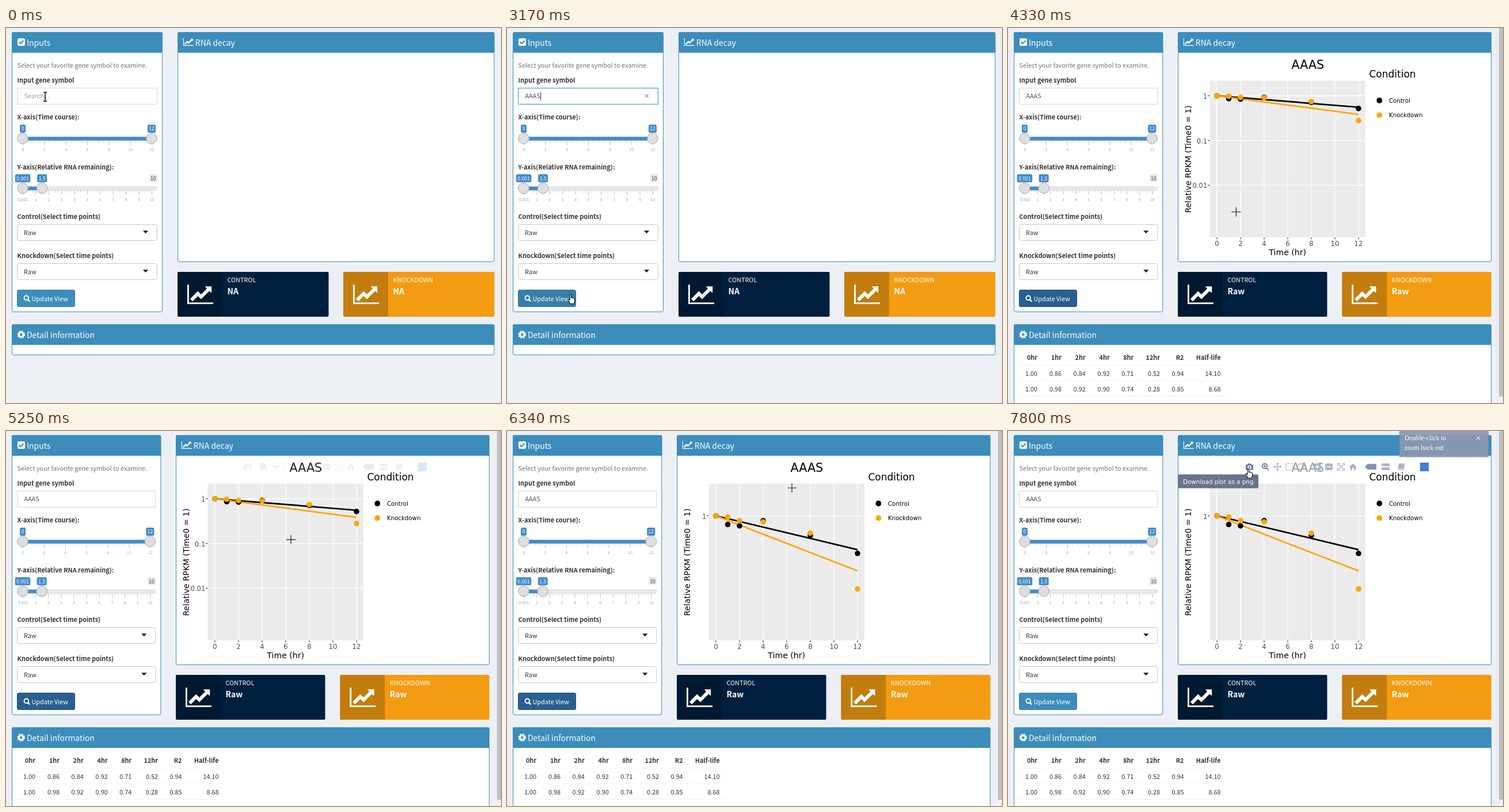
An HTML page that plays this animation: 860 px wide and 652 px high, repeating every 8 s.

```html
<!DOCTYPE html>
<html lang="en">
<head>
<meta charset="utf-8">
<title>RNA decay</title>
<style>
  html, body { margin: 0; width: 100%; height: 100%; overflow: hidden; background: #ecf0f5; }
  svg { display: block; width: 860px; height: 652px; }
  text { font-family: 'Noto Sans CJK JP', 'Noto Sans CJK SC', 'Noto Sans CJK', 'Open Sans', sans-serif; white-space: pre; }
  .b { font-weight: 700; }
  .v { font-family: 'DejaVu Sans', Verdana, sans-serif; }
  .s { font-family: 'Liberation Serif', serif; }
</style>
</head>
<body>
<svg id="stage" viewBox="0 0 860 652"></svg>
<script>
const BLUE = '#3c8dbc', SLIDE = '#428bca', BODY = 10.85, HEAD = 13.95;
const CHART = 'M2048 1536v128h-2048v-1536h128v1408h1920zM1920 288v435q0 21-19.5 29.5t-35.5-7.5l-121-121-633 633q-10 10-23 10t-23-10l-233-233-416 416-192-192 585-585q10-10 23-10t23 10l233 233 464-464-121-121q-16-16-7.5-35.5t29.5-19.5h435q14 0 23 9t9 23z';

const txt = (x, y, s, size = BODY, fill = '#333', more = '') =>
  `<text x="${x}" y="${y}" font-size="${size}" fill="${fill}" ${more}>${s}</text>`;
const bold = (x, y, s, size = BODY, fill = '#333', more = '') => txt(x, y, s, size, fill, 'class="b" ' + more);
const rect = (x, y, w, h, fill, more = '') =>
  `<rect x="${x}" y="${y}" width="${w}" height="${h}" fill="${fill}" ${more}/>`;
const dot = (x, y, r, fill, more = '') => `<circle cx="${x}" cy="${y}" r="${r}" fill="${fill}" ${more}/>`;
const line = (d, stroke, w = 1, more = '') => `<path d="${d}" fill="none" stroke="${stroke}" stroke-width="${w}" ${more}/>`;
const group = (id, s, more = '') => `<g id="${id}" ${more}>${s}</g>`;
const mid = 'text-anchor="middle"', end = 'text-anchor="end"';
const chart = (x, y, w) => `<path fill="#fff" transform="translate(${x} ${y}) scale(${w / 2048})" d="${CHART}"/>`;

function box(x, y, right, bottom, title, titleX) {
  return rect(x + .5, y + .5, right - x - 1, bottom - y - 1, '#fff', `rx="2.5" stroke="${BLUE}"`) +
    rect(x, y, right - x, 35.7, BLUE, 'rx="2"') + rect(x, y + 20, right - x, 15.7, BLUE) +
    txt(titleX, y + 23.2, title, HEAD, '#fff');
}

function bubble(x, y, s, w) {
  return rect(x - w / 2, y, w, 14, SLIDE, 'rx="2.5"') + txt(x, y + 10.4, s, 8.55, '#fff', mid);
}

function slider(y, right, to, labels, minor) {
  const x = 29, len = right - 9.5 - x, step = len / (labels.length - 1);
  let s = rect(19.5, y - 2.5, right - 19.5, 6, '#e9e9e9', 'rx="3" stroke="#d0d0d0" stroke-width=".8"') +
    rect(x, y - 2.8, len * to, 6.4, SLIDE);
  for (let i = 0; i <= (labels.length - 1) * minor; i++) {
    const tx = x + .5 + i * step / minor, major = i % minor == 0;
    s += line(`M${tx} ${y + 4}v${major ? 7.5 : 3.5}`, major ? '#8fc1e3' : '#c4d3dc', .9);
  }
  labels.forEach((l, i) => s += txt(x + .5 + i * step, y + 22, l, 7, '#96a9ab', mid));
  for (const tx of [x, x + len * to]) s += dot(tx, y, 9.3, '#dedede', 'stroke="#a9a9a9"');
  return s;
}

function select(y, right) {
  return rect(19.5, y, right - 19.5, 28, '#fff', 'rx="3.5" stroke="#c8c8c8"') + txt(31, y + 18.2, 'Raw') +
    `<path d="M${right - 24.7} ${y + 10.8}h9.4l-4.7 5z" fill="#222"/>`;
}

function valueBox(x, w, fill, name, value) {
  return rect(x, 424, w, 78, fill, 'rx="2"') + rect(x, 424, 78, 78, '#000', 'rx="2" opacity=".2"') +
    chart(x + 17, 443.5, 45) + txt(x + 86.5, 441.6, name, BODY, '#fff') + bold(x + 86.5, 462.6, value, HEAD, '#fff');
}

function page(id, left, plotX, right, vbW, vb2, value, bottom) {
  const r = left - 9.5, len = r - 38.5;
  const counts = [...Array(10)].map((_, i) => i + 1);
  return group(id,
    box(10, 7.3, left, 494, 'Inputs', 36) +
    rect(20, 18, 13, 13, '#fff', 'rx="2.5"') + line('M22.7 24.3l2.8 2.9 5.2-5.4', BLUE, 2.1) +
    box(plotX, 7.3, right, 407, 'RNA decay', plotX + 30.8) + chart(plotX + 9.8, 16.3, 18) +
    txt(19.5, 69.3, 'Select your favorite gene symbol to examine.', BODY, '#737373') +
    bold(19.5, 95.2, 'Input gene symbol') +
    rect(19.5, 104.5, r - 19.5, 28, '#fff', 'class="field" stroke="#d2d6de"') +
    bold(19.5, 159.3, 'X-axis(Time course):') +
    slider(192, r, 1, [0, 2, 4, 6, 8, 10, 12], 4) + bubble(29, 168, '0', 10) + bubble(29 + len, 168, '12', 14) +
    bold(19.5, 245.6, 'Y-axis(Relative RNA remaining):') +
    slider(278.5, r, .15, ['0.001', ...counts], 4) +
    bubble(29, 254.3, '0.001', 26.5) + bubble(29 + len * .15, 254.3, '1.5', 17) +
    rect(r - 13.5, 254.3, 13.5, 13.3, '#e4e4e4', 'rx="2.5"') + txt(r - 6.7, 264.5, '10', 8.55, '#444', mid) +
    bold(19.5, 332, 'Control(Select time points)') + select(341.5, r) +
    bold(19.5, 399.8, 'Knockdown(Select time points)') + select(409.5, r) +
    `<g class="vals">${valueBox(plotX, vbW, '#001f3f', 'CONTROL', value)}${valueBox(vb2, vbW, '#f39c12', 'KNOCKDOWN', value)}</g>` +
    box(10, 515.3, right, bottom, 'Detail information', 36) +
    dot(26.3, 533, 3.9, 'none', 'stroke="#fff" stroke-width="3.2"') +
    dot(26.3, 533, 5.8, 'none', 'stroke="#fff" stroke-width="2" stroke-dasharray="2.6 1.955"'));
}

function table() {
  const cols = [51, 93, 134.7, 176.7, 218.3, 264, 305.5, 369.5];
  const rows = ['0hr 1hr 2hr 4hr 8hr 12hr R2 Half-life', '1.00 0.86 0.84 0.92 0.71 0.52 0.94 14.10', '1.00 0.98 0.92 0.90 0.74 0.28 0.85 8.68'];
  return rows.map((row, j) => row.split(' ').map((s, i) =>
    (j ? txt : bold)(cols[i], [577.3, 604.7, 631.5][j], s, BODY, '#333', end)).join('')).join('') +
    line('M19 586.3H379M19 613.3H379M19 640.3H379', '#f2f2f2');
}

const hourX = h => 363 + h * 20.5;
const series = [
  ['#000', 14.10, [1, .86, .84, .92, .71, .52]],
  ['#ffa500', 8.68, [1, .98, .92, .90, .74, .28]]];

// one: y of value 1, decade: pixels per factor of ten
function plot(id, one, decade) {
  const py = v => one - decade * Math.log10(v);
  let s = rect(350.5, 91.5, 270.3, 272.5, '#ebebeb');
  for (let h = 0; h <= 12; h += 2) s += line(`M${hourX(h)} 91.5V364`, '#fff', 1.2);
  ['1', '0.1', '0.01'].forEach(l => {
    const y = py(+l);
    if (y < 360) s += line(`M350.5 ${y}h270.3`, '#fff', 1.2) + line(`M347 ${y}h3.5`, '#333', 1.1) +
      txt(346.3, y + 5, l, 11.6, '#4d4d4d', 'class="v" ' + end);
  });
  for (const [c, half] of series) s += line(`M${hourX(0)} ${one}L${hourX(12)} ${py(2 ** (-12 / half))}`, c, 2.7);
  for (const [c, , vals] of series)
    vals.forEach((v, i) => s += dot(hourX([0, 1, 2, 4, 8, 12][i]), py(v), 4.8, c));
  return group(id, s);
}

function frame() {
  let s = '';
  for (let h = 0; h <= 12; h += 2)
    s += line(`M${hourX(h)} 364v3.5`, '#333', 1.1) + txt(hourX(h), 379, h, 11.6, '#4d4d4d', 'class="v" ' + mid);
  s += txt(485.7, 395, 'Time (hr)', 14.1, '#000', 'class="v" ' + mid) +
    txt(0, 0, 'Relative RPKM (Time0 = 1)', 13.9, '#000', `class="v" ${mid} transform="translate(318.3 228) rotate(-90)"`) +
    txt(520.8, 71, 'AAAS', 20.7, '#000', 'class="v" ' + mid) +
    txt(627.5, 86.2, 'Condition', 17, '#000', 'class="v"');
  ['Control', 'Knockdown'].forEach((n, i) =>
    s += dot(645.3, 126 + i * 25.4, 4.9, series[i][0]) + txt(662, 129.8 + i * 25.4, n, 10.2, '#000', 'class="v"'));
  return s;
}

function modebar() {
  const c = '#a9b2c7', on = '#6d7b9e';
  return rect(409, 53.5, 329, 18, '#fff', 'opacity=".6"') +
    group('cam', '<path fill-rule="evenodd" d="M413 58.5h3l1.2-2h4.6l1.2 2h3v9.3h-13zM419.5 59.8a3.3 3.3 0 1 0 .01 0z"/>' + dot(419.5, 63.1, 1.7, 'inherit'), `fill="${c}"`) +
    dot(446, 61, 4.2, 'none', `stroke="${on}" stroke-width="2"`) + line('M449 64.3l4.2 4.2M443.8 61h4.4M446 58.8v4.4', on, 1.7) +
    line('M462 62h12.5M468.2 56v12.5M464 60l-2 2 2 2M472.4 60l2 2-2 2M466.2 58l2-2 2 2M466.2 66.5l2 2 2-2', c, 1.3) +
    rect(483, 56.5, 11.5, 11.5, 'none', `stroke="${c}" stroke-width="1.6" stroke-dasharray="2 1.6"`) +
    line('M506 67.5c-5-3-3-10 3-10.500s8 5 2 7.500-6 2-4 4.500', c, 1.5) +
    rect(531, 56.500, 12.500, 11.500, c, 'rx="1.5"') + line('M534 62.300h6.500M537.200 59v6.500', '#fff', 1.7) +
    rect(551.300, 56.500, 12.500, 11.500, c, 'rx="1.5"') + line('M554 62.300h7', '#fff', 1.7) +
    line('M573 60v-3.500h3.500M581 56.500h3.500V60M584.500 64.500V68H581M576.500 68H573v-3.500M575 58.500l7.500 7.500M582.500 58.500l-7.500 7.500', c, 1.4) +
    `<path fill="${c}" d="M592.800 62.500l6.600-6 6.600 6h-1.700v5.500h-3.500v-4h-2.800v4h-3.500v-5.500z"/>` +
    `<path fill="${on}" opacity=".85" d="M620 62l5-4.700h15v9.600h-15z"/>` +
    `<path fill="${c}" d="M648 59l2.200-2.500H663v4.800h-12.800zM648 65.500l2.200-2.300H663v4.800h-12.800z"/>` +
    `<path fill="${c}" d="M679.500 56.500h9.500l-2.300 9h-9.700z"/>` + line('M677.500 67.300h9.500l2-8', c, 1.2) +
    rect(716, 55, 15, 15, '#447adb');
}

function button() {
  return rect(19.5, 455.5, 100, 29, BLUE, 'id="btn" rx="2.5" stroke="#367fa9"') +
    dot(35.3, 469.3, 3.8, 'none', 'stroke="#fff" stroke-width="2"') + line('M38 472.200l3.200 3.300', '#fff', 2.5) +
    txt(44.5, 475, 'Update View', BODY, '#fff');
}

const HAND = 'M-1.300 8V1.200q0-1.200 1.200-1.200t1.200 1.200V6q1.200-.9 2.100.3 1.300-.7 2 .5 1.800-.5 1.800 1.300v3.500q0 2-1.200 3.700v1.200H-1v-1.200q-1-1.800-3-4.500-1-2 .6-2.200 1.100 0 2.100 1.400z';
const cursors =
  group('ibeam', line('M-3 -8q3 0 3 1.500q0-1.500 3-1.500M0-7V7M-3 8q3 0 3-1.500q0 1.500 3 1.500', '#111', 1.6)) +
  group('arrow', '<path d="M0 0v18.500l4.300-4 3.500 8 3.200-1.400-3.500-7.700h6z" fill="#111" stroke="#fff" stroke-width=".8"/>') +
  group('hand', `<path d="${HAND}" fill="#fff" stroke="#111" stroke-width="1.100"/>`) +
  group('cross', line('M-8 0H8M0-8V8', '#111', 1.100));

const stage = document.getElementById('stage');
stage.innerHTML =
  rect(0, 0, 860, 652, '#ecf0f5') +
  page('wide', 272, 298, 848.5, 262.500, 586, 'NA', 569) +
  page('narrow', 269.300, 295, 840, 259.500, 580.300, 'Raw', 700) +
  txt(31.5, 122.400, 'Search...', BODY, '#999', 'id="hint"') + txt(31.5, 122.400, '', BODY, '#555', 'id="typed"') +
  rect(31.600, 111.500, 1, 14, '#222', 'id="caret"') +
  group('clear', line('M239.700 115.200l6 6M245.700 115.200l-6 6', '#888', 1.100)) +
  button() +
  group('result',
    rect(853, 0, 7, 652, '#f1f1f1') + rect(853, 0, 7, 641, '#bfbfc1') + table() +
    plot('full', 117.800, 77.800) + plot('zoomed', 147.500, 230) + frame() +
    group('drag', '<path id="shade" fill="#000" fill-opacity=".4" fill-rule="evenodd"/>' +
      rect(476.500, 0, 35.500, 2.800, '#fff', 'id="grip" stroke="#444" stroke-width=".9"') +
      rect(476.500, 190.700, 35.500, 2.800, '#fff', 'stroke="#444" stroke-width=".9"')) +
    group('bar', modebar()) +
    group('note', rect(680.500, -1, 154, 46, '#8c97af', 'opacity=".92" stroke="#7c8cb0"') +
      txt(689, 16, 'Double-click to', 11.550, '#fff', 'class="s"') + txt(689, 32.600, 'zoom back out', 11.550, '#fff', 'class="s"') +
      line('M813.500 8.500l7 7M820.500 8.500l-7 7', '#fff', 1)) +
    group('tip', '<path d="M415 76l4.500-5 4.500 5z" fill="#69738a"/>' + rect(295.500, 75.500, 139.500, 24, '#69738a', 'rx="2"') +
      txt(304, 91.500, 'Download plot as a png', 10.390, '#fff', 'class="v"'))) +
  group('cursor', cursors);

const $ = id => document.getElementById(id);
const show = (id, on) => $(id).style.display = on ? '' : 'none';
const fields = document.querySelectorAll('.field'), vals = document.querySelectorAll('.vals');

// piecewise linear value from [time, a, b...] keys
function at(keys, t, k = 1) {
  let i = keys.findIndex(p => p[0] > t);
  if (i < 0) return keys[keys.length - 1][k];
  if (i == 0) return keys[0][k];
  const p = keys[i - 1], q = keys[i];
  return p[k] + (q[k] - p[k]) * (t - p[0]) / (q[0] - p[0]);
}

const MOVE = [[60, 68, 119.500], [280, 70, 115.500], [2650, 70, 115.500], [2920, 116, 300], [3170, 110.500, 463],
  [4150, 110.500, 463], [4330, 396, 320], [4730, 519, 208], [4790, 519, 208], [5100, 495, 192], [5240, 495, 191],
  [5410, 495, 158], [5570, 495, 120.500], [5730, 495, 106], [5880, 495, 99], [6520, 495, 99], [6800, 523, 63],
  [7340, 425, 64], [7420, 417.500, 65.500]];
const FOCUS = [[640, 0], [820, 1], [3280, 1], [3400, 0]];
const FADE = [[3880, 1], [4090, .775], [4250, .6], [4251, 1]];
const BAR = [[5210, 0], [5320, .5], [5480, 0], [6520, 0], [6760, 1]];
const NOTE = [[6500, 0], [6780, 1]];
const TIP = [[7380, 0], [7560, 1]];
const KEYS = [1610, 1850, 2160, 2480];

function cursorKind(t, x, y, done) {
  if (t > 7400) return 'hand';
  if (!done && y < 133) return 'ibeam';
  if (y > 455 && x < 120) return 'hand';
  if (done && x > 350 && x < 621 && y > 91 && y < 364) return 'cross';
  return 'arrow';
}

function buttonLook(t) {
  if (t < 3090 || t >= 7800) return [BLUE, '#367fa9'];
  if (t < 3320) return ['#367fa9', '#2f6f95'];
  if (t < 3540 || t >= 4250) return ['#286090', '#204d74'];
  return ['#367fa9', '#204d74'];
}

function render(t) {
  const done = t >= 4250, x = at(MOVE, t), y = at(MOVE, t, 2), n = KEYS.filter(k => k <= t).length;
  show('wide', !done); show('narrow', done); show('result', done);
  show('full', t < 6340); show('zoomed', t >= 6340);

  const f = at(FOCUS, t), mix = (a, b) => Math.round(a + (b - a) * f);
  fields.forEach(e => e.setAttribute('stroke', `rgb(${mix(210, 60)},${mix(214, 141)},${mix(222, 188)})`));
  vals.forEach(e => e.setAttribute('opacity', at(FADE, t)));
  show('hint', n == 0);
  $('typed').textContent = 'AAAS'.slice(0, n);
  show('caret', t >= 700 && t < 3340);
  $('caret').setAttribute('x', 31.600 + n * 6.600);
  $('clear').setAttribute('opacity', t < 3340 ? at([[1580, 0], [1700, 1]], t) : 0);

  const [fill, edge] = buttonLook(t);
  $('btn').setAttribute('fill', fill);
  $('btn').setAttribute('stroke', edge);

  const dragging = t >= 5290 && t < 6340;
  show('drag', dragging);
  if (dragging) {
    $('shade').setAttribute('d', `M350.500 91.500h270.300V364H350.500zM350.500 ${y + 1.500}h270.300V190.500H350.500z`);
    $('grip').setAttribute('y', y - 1.700);
  }
  $('bar').setAttribute('opacity', at(BAR, t));
  $('note').setAttribute('opacity', at(NOTE, t));
  $('tip').setAttribute('opacity', at(TIP, t));
  $('cam').setAttribute('fill', t > 7400 ? '#6d7b9e' : '#a9b2c7');

  const kind = cursorKind(t, x, y, done);
  for (const k of ['ibeam', 'arrow', 'hand', 'cross']) show(k, k == kind);
  $('cursor').setAttribute('transform', `translate(${x} ${y})`);
}

const start = performance.now();
function tick() {
  render((performance.now() - start) % 8000);
  requestAnimationFrame(tick);
}
tick();
</script>
</body>
</html>
```
